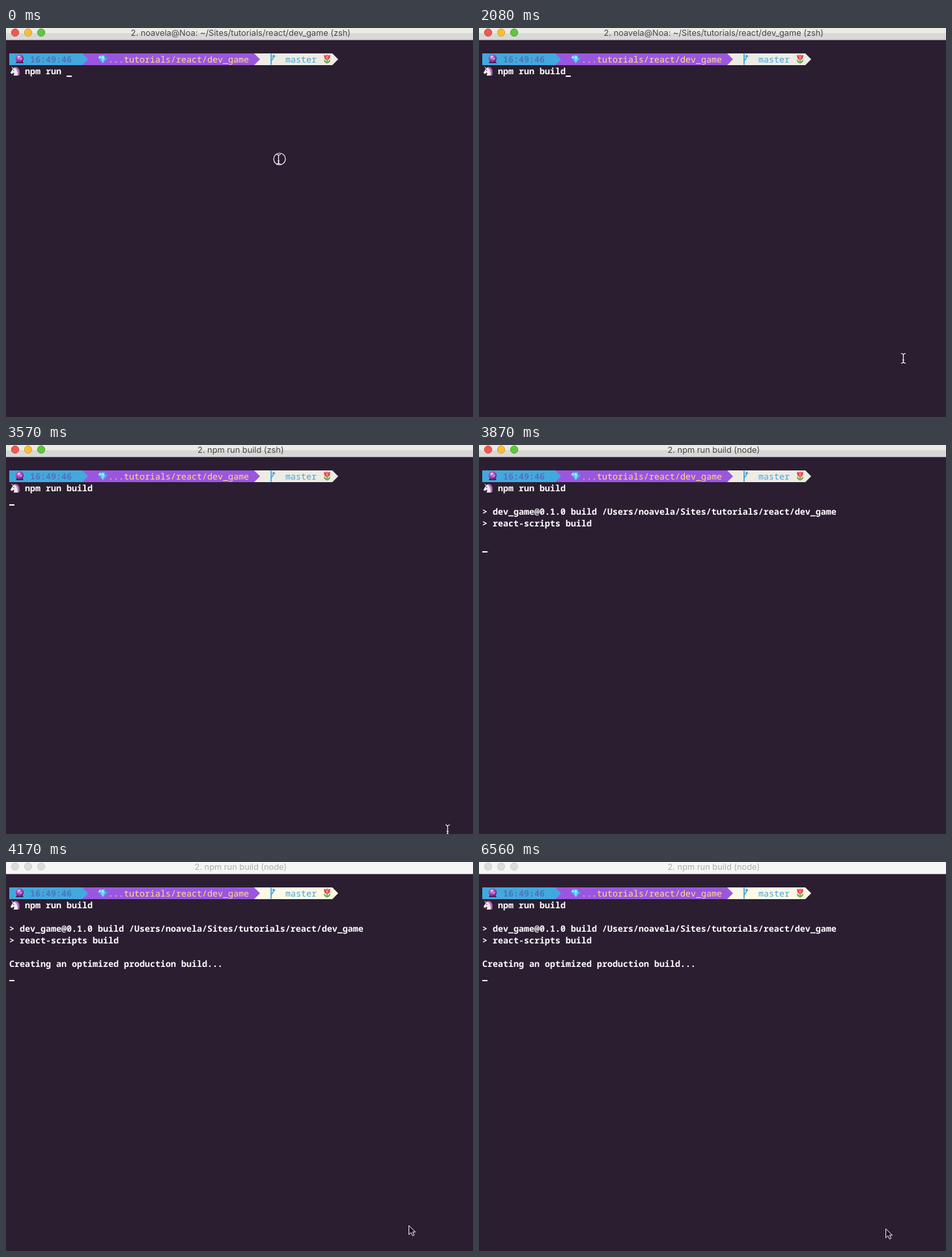
These frames come from a looping animation (717x597 px, 8000 ms). An HTML page:

```html
<!DOCTYPE html>
<html lang="en">
<head>
<meta charset="utf-8">
<title>Terminal build</title>
<style>
  html, body { margin: 0; width: 100%; height: 100%; overflow: hidden; background: #2b1e31; }
  svg { display: block; width: 717px; height: 597px; }
  text { white-space: pre; text-rendering: geometricPrecision; }
  .mono { font: 600 13.333px "Noto Sans Mono", "DejaVu Sans Mono", monospace; fill: #fff; }
  .thin { font-weight: 400; }
  #title { font: 400 12.8px Inter, Roboto, sans-serif; text-anchor: middle; }
</style>
</head>
<body>
<svg viewBox="0 0 717 597" xmlns="http://www.w3.org/2000/svg">
  <defs>
    <radialGradient id="orb" cx=".4" cy=".35" r=".65">
      <stop offset="0" stop-color="#f0b4ea"/>
      <stop offset=".45" stop-color="#b04bbb"/>
      <stop offset="1" stop-color="#652078"/>
    </radialGradient>
  </defs>
  <rect width="717" height="597" fill="#2b1e31"/>

  <g id="bar">
    <rect id="barTop" width="717" height="8"/>
    <rect id="barLow" y="8" width="717" height="10.5"/>
    <circle class="light" cx="14" cy="7" r="5.7"/>
    <circle class="light" cx="34" cy="7" r="5.7"/>
    <circle class="light" cx="54" cy="7" r="5.7"/>
    <text id="title" x="360.3" y="11.8"></text>
  </g>

  <g id="prompt">
    <path id="git" d="M380 39H501L510 48L501 57H380Z"/>
    <path d="M116 39H381L390 48L381 57H116Z" fill="#9b56e0"/>
    <path d="M5 39H117L126 48L117 57H5Z" fill="#42a9de"/>
    <text class="mono" x="37" y="53" style="fill:#5571b6">16:49:46</text>
    <text class="mono thin" x="157" y="53" style="fill:#fbe07e">...tutorials/react/dev_game</text>
    <text class="mono thin" x="429" y="53" style="fill:#42a5dd">master</text>
    <path d="M407 39.5V56.5M407 51.5C407 47.5 411 49 411 43" fill="none" stroke="#42a5dd" stroke-width="1.8"/>
    <path d="M408 44.2L411 40.4L414 44.2Z" fill="#42a5dd"/>
  </g>

  <g id="ball">
    <path d="M16.5 51H25.5L27 54H15Z" fill="#3f2452"/>
    <circle cx="21" cy="46.8" r="6.2" fill="url(#orb)"/>
    <path d="M18 44.5Q20 42.5 22 43.5M22 49L24.5 46" fill="none" stroke="#f8d9f5" stroke-width="1.1"/>
  </g>
  <g id="gem">
    <path d="M144.5 42H152.5L156 46L148.6 54L141.5 46Z" fill="#47b9ea"/>
    <path d="M144.5 42L146 46H141.5ZM148.5 42L151.5 46H146Z" fill="#b9ecfb"/>
    <path d="M146 46H151.5L148.6 54Z" fill="#80d8f6"/>
    <path d="M152.5 42L156 46H151.5Z" fill="#2a91cf"/>
  </g>
  <g id="tulip">
    <path d="M493 47V54.3" stroke="#4c9a3a" stroke-width="1.5"/>
    <path d="M492.7 54.5Q488 53 488 48.5Q492 50 492.7 54.5ZM493.3 54.5Q498 53 498 48.5Q494 50 493.3 54.5Z" fill="#5fae45"/>
    <path d="M488.3 41L491 42.3L493 40.5L495 42.3L497.7 41Q498.5 48.8 493 49Q487.5 48.8 488.3 41Z" fill="#e2474d"/>
    <path d="M493 41Q489.6 45 493 48.8Q496.4 45 493 41Z" fill="#f4837d"/>
  </g>
  <g id="unicorn">
    <path d="M12 60.5Q18.5 58.5 20.5 65Q21.5 69 20 73L15 72Z" fill="#a967b5"/>
    <path d="M12 61.3L14.5 61Q19 65 18 73H11.5Q13.3 70 12 68.5L9.2 70.6Q7 70.3 7 68.3L10 63.5Z" fill="#eee9ef"/>
    <path d="M10 63L8 58.8L12 61.7Z" fill="#d79ac4"/>
    <path d="M13 60.5Q17.8 63 18 68" fill="none" stroke="#dc80bb" stroke-width="1.5"/>
    <circle cx="11.7" cy="65" r=".8" fill="#3b2942"/>
  </g>

  <g id="lines"></g>
  <rect id="caret" width="8" height="2" fill="#fff"/>

  <g id="beam" fill="none" stroke="#fff" stroke-width="1.2">
    <path d="M-3.5 -7.5Q0 -7.5 0 -4.5Q0 -7.5 3.5 -7.5M0 -5V5M-3.5 7.5Q0 7.5 0 4.5Q0 7.5 3.5 7.5M-1.5 2.5H1.5"/>
    <circle id="ring" cx="1.5" cy="-.5" r="9"/>
  </g>
  <path id="arrow" d="M.6 1V14.8L3.9 11.7L6.3 16.6L8.7 15.5L6.4 10.8H10.6Z" fill="#17101b" stroke="#fff"/>
</svg>
<script>
const LOOP = 8000;
const $ = id => document.getElementById(id);
const USER = "noavela";

const shellTitle = `2. ${USER}@Noa: ~/Sites/tutorials/react/dev_game (zsh)`;
const runTitle = "2. npm run build (zsh)";
const nodeTitle = "2. npm run build (node)";
const output = [
  [107, `> dev_game@0.1.0 build /Users/${USER}/Sites/tutorials/react/dev_game`],
  [125, "> react-scripts build"],
  [161, "Creating an optimized production build..."]
];

// Each step changes only the listed parts of the running state.
const start = { typed: 0, rows: 0, title: shellTitle, caret: true, caretRow: 0,
  beam: [418.5, 201.5], ring: true, arrow: null, active: true };
const steps = [
  [150, { typed: 1, ring: false }],
  [300, { typed: 2 }],
  [450, { typed: 3 }],
  [740, { typed: 4, beam: [460, 230] }],
  [890, { typed: 5, beam: [528, 276] }],
  [1040, { beam: [568, 301] }],
  [1190, { beam: null }],
  [1340, { caret: false }],
  [1790, { caret: true }],
  [2080, { beam: [651.5, 507] }],
  [2380, { caret: false, beam: [660, 508] }],
  [2530, { beam: [651, 507] }],
  [2830, { caret: true }],
  [3130, { beam: [655, 518] }],
  [3280, { beam: [662, 541] }],
  [3420, { title: runTitle, caretRow: 1, beam: [671, 568] }],
  [3570, { beam: [678, 590.5] }],
  [3720, { title: nodeTitle, rows: 2, caretRow: 5, beam: null }],
  [4020, { rows: 3, caretRow: 6 }],
  [4170, { active: false, arrow: [618, 557] }],
  [6120, { arrow: [619, 558] }],
  [6265, { arrow: [621, 559] }],
  [6410, { arrow: [623, 561] }],
  [6560, { arrow: [624, 562] }]
];

function addLine(x, y, content) {
  const el = document.createElementNS("http://www.w3.org/2000/svg", "text");
  el.setAttribute("class", "mono");
  el.setAttribute("x", x);
  el.setAttribute("y", y);
  el.textContent = content;
  return $("lines").appendChild(el);
}

const command = addLine(29, 71, "");
const rows = output.map(([y, content]) => addLine(5, y, content));
const lights = document.querySelectorAll(".light");
const lit = ["#ee5a52", "#f7be3b", "#60c63f"];
const rims = ["#d2463f", "#d9a02c", "#46a92c"];

const show = (el, on) => el.setAttribute("visibility", on ? "inherit" : "hidden");

function place(el, pos) {
  show(el, pos);
  if (pos) el.setAttribute("transform", `translate(${pos})`);
}

function draw(t) {
  const s = { ...start };
  for (const [at, change] of steps) if (t >= at) Object.assign(s, change);

  command.textContent = "npm run " + "build".slice(0, s.typed);
  rows.forEach((el, i) => show(el, i < s.rows));

  $("caret").setAttribute("x", s.caretRow ? 5 : 93 + 8 * s.typed);
  $("caret").setAttribute("y", 73 + 18 * s.caretRow);
  show($("caret"), s.caret);

  $("title").textContent = s.title;
  $("title").setAttribute("fill", s.active ? "#47464a" : "#adadad");
  $("barTop").setAttribute("fill", s.active ? "#ecebe3" : "#f6f6f6");
  $("barLow").setAttribute("fill", s.active ? "#d8d8d7" : "#f6f6f6");
  $("git").setAttribute("fill", s.active ? "#edece4" : "#fff8e4");
  lights.forEach((el, i) => {
    el.setAttribute("fill", s.active ? lit[i] : "#dcdcdc");
    el.setAttribute("stroke", s.active ? rims[i] : "#d0d0d0");
  });

  place($("beam"), s.beam);
  show($("ring"), s.ring);
  place($("arrow"), s.arrow);
}

const t0 = performance.now();
function tick() {
  draw((performance.now() - t0) % LOOP);
  requestAnimationFrame(tick);
}
tick();
</script>
</body>
</html>
```
